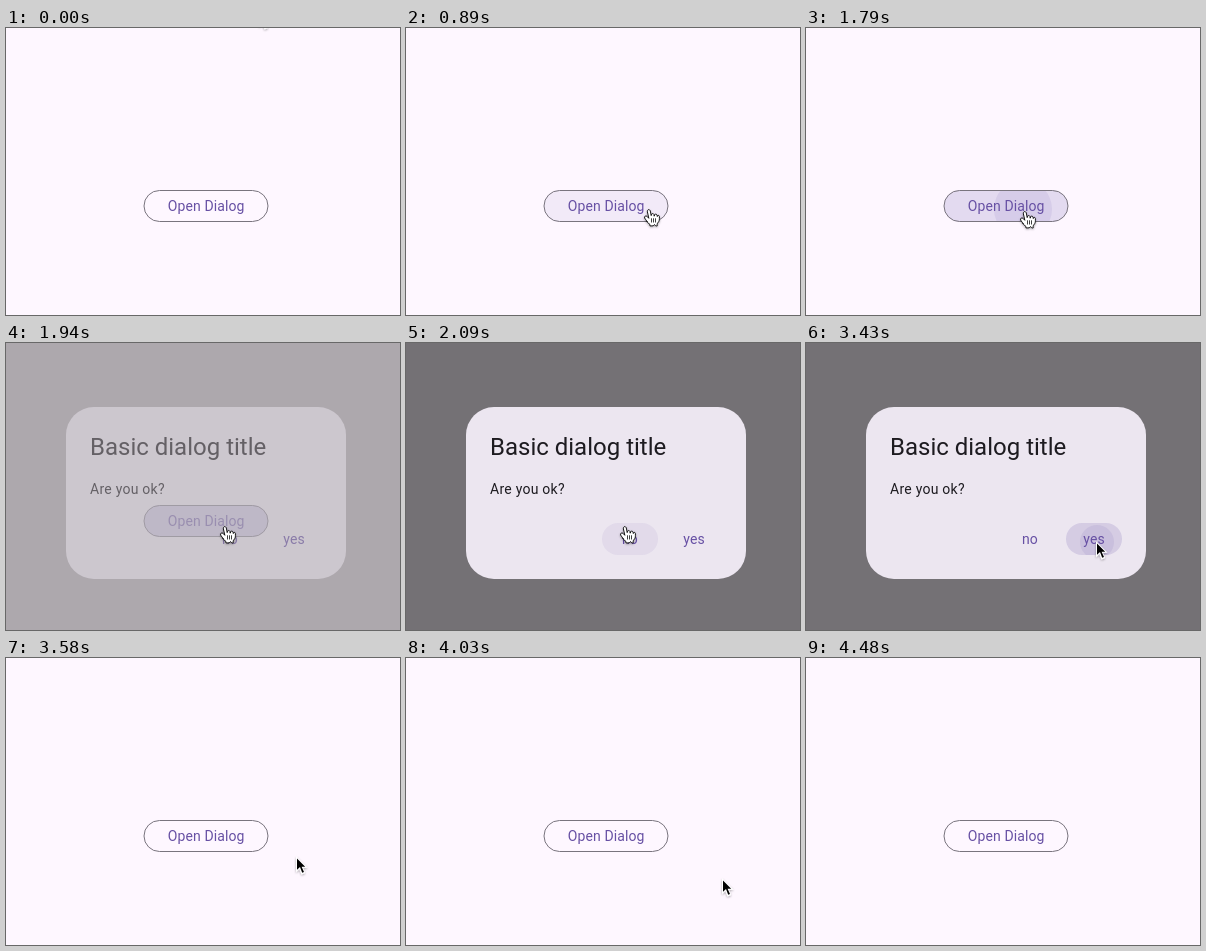
An HTML page for the animation above (4.64 s loop, 394 by 287 pixels).

```html
<!DOCTYPE html>
<html lang="en">
<head>
<meta charset="utf-8">
<title>Open dialog</title>
<style>
  html, body { margin: 0; width: 100%; height: 100%; overflow: hidden; background: #fef7ff; }
  svg { display: block; width: 100vw; height: 100vh; }
  text { font: 400 14px Roboto, sans-serif; fill: #1d1b20; }
  .label { fill: #6750a4; letter-spacing: .1px; text-anchor: middle; }
  .title { font-size: 24px; }
  .body { letter-spacing: .25px; }
  .ink { fill: #6750a4; }
</style>
</head>
<body>
<svg viewBox="0 0 394 287">
  <defs>
    <clipPath id="openClip"><rect x="138" y="162" width="124" height="32" rx="16"/></clipPath>
    <clipPath id="yesClip"><rect x="260" y="180" width="56" height="32" rx="16"/></clipPath>
    <filter id="shadow" x="-50%" y="-50%" width="200%" height="200%">
      <feDropShadow dx="0" dy="1" stdDeviation="0.9" flood-color="#000" flood-opacity=".35"/>
    </filter>
  </defs>

  <rect width="394" height="287" fill="#fef7ff"/>

  <g clip-path="url(#openClip)" class="ink">
    <rect id="openHover" x="138" y="162" width="124" height="32" opacity=".08"/>
    <rect id="openPress" x="138" y="162" width="124" height="32" opacity=".1"/>
    <circle id="openSplash" cx="217" cy="181" opacity=".1"/>
  </g>
  <rect x="138" y="162.5" width="124" height="31" rx="15.5" fill="none" stroke="#79747e"/>
  <text class="label" x="200.2" y="183">Open Dialog</text>

  <rect id="barrier" width="394" height="287"/>

  <g id="dialog">
    <rect x="60" y="64" width="280" height="172" rx="28" fill="#ece6f0"/>
    <text class="title" x="84" y="112">Basic dialog title</text>
    <text class="body" x="84" y="151">Are you ok?</text>
    <rect id="noHover" class="ink" x="196" y="180" width="56" height="32" rx="16" opacity=".08"/>
    <g clip-path="url(#yesClip)" class="ink">
      <rect id="yesHover" x="260" y="180" width="56" height="32" opacity=".08"/>
      <rect id="yesPress" x="260" y="180" width="56" height="32" opacity=".1"/>
      <circle id="yesSplash" cx="291" cy="199" opacity=".1"/>
    </g>
    <text class="label" x="224" y="201">no</text>
    <text class="label" x="288" y="201">yes</text>
  </g>

  <g id="arrow">
    <path filter="url(#shadow)" fill="#fff" d="M-1-2.4V13.6L2.4 10.4 4.5 15.8 8.1 14.3 5.9 9.2H10.6Z"/>
    <path d="M0 0V11.2L3 8.3 5.2 14.2 7 13.4 4.6 8.2H8.2Z"/>
  </g>

  <g id="hand" stroke="#000" stroke-width=".9" stroke-linejoin="round" stroke-linecap="round">
    <path filter="url(#shadow)" fill="#fff" d="M3.2 12.8C2.5 11.6 1.2 9.9.6 9 .1 7.4 1.7 6.1 3.2 7.5L4.8 9.3C4.5 7 3.7 4.7 3.4 2.9 3.1.2 5.6-.2 6.3 2L7.2 6.6C7 4.4 9.4 4 10 5.5L10.2 7.2C10.2 4.9 12.4 4.6 13 6L13.3 7.5C13.5 6 15.3 6 15.4 7.6V9.4C15.4 11.4 15 12.3 14.3 13.2 13.2 14.4 13 15 13.2 16.9 11.9 17.2 11.4 16.6 10.9 15.8Q10.6 15.4 10.2 15.8C9.5 17 9.2 16.9 6 16.9 6.1 15.2 5.3 15 3.2 12.8Z"/>
    <path fill="none" stroke-width=".75" d="M7.5 9.7V13.1M9.5 9.7V13.1M11.5 9.7V13.1"/>
  </g>
</svg>

<script>
const LOOP = 4640;
const el = id => document.getElementById(id);
const show = (id, on) => el(id).style.display = on ? "" : "none";

// Pointer stops: start time, shape, position
const pointer = [
  [0, "arrow", 254, -14.4],
  [740, "arrow", 243, 125.6],
  [890, "hand", 238, 181],
  [1040, "hand", 229, 182],
  [1190, "hand", 215, 182.6],
  [1340, "hand", 214, 183],
  [2530, "hand", 215, 183],
  [2680, "hand", 282, 198],
  [2830, "hand", 286, 201],
  [2980, "arrow", 291, 200.6],
  [4030, "arrow", 317, 222.6],
  [4180, "arrow", 363, 275.6],
  [4330, "arrow", 364, 283.4],
  [4480, "none", 0, 0]
];

function draw(t) {
  const within = (from, to) => t >= from && t < to;

  const [, shape, x, y] = pointer.findLast(stop => stop[0] <= t);
  for (const id of ["arrow", "hand"]) {
    show(id, id === shape);
    el(id).setAttribute("transform", `translate(${x} ${y})`);
  }

  show("openHover", within(890, 2090));
  show("openPress", within(1790, 2090));
  el("openSplash").setAttribute("r", within(1790, 1940) ? 29 : within(1940, 2090) ? 90 : 0);

  const opening = within(1940, 2090);
  const open = within(2090, 3580);
  el("barrier").setAttribute("opacity", open ? .54 : opening ? .323 : 0);
  el("dialog").setAttribute("opacity", open ? 1 : opening ? .5 : 0);

  show("noHover", within(2090, 2680));
  show("yesHover", within(2680, 3580));
  show("yesPress", within(3430, 3580));
  el("yesSplash").setAttribute("r", within(3430, 3580) ? 17 : 0);
}

const start = performance.now();
function tick() {
  draw((performance.now() - start) % LOOP);
  requestAnimationFrame(tick);
}
tick();
</script>
</body>
</html>
```
